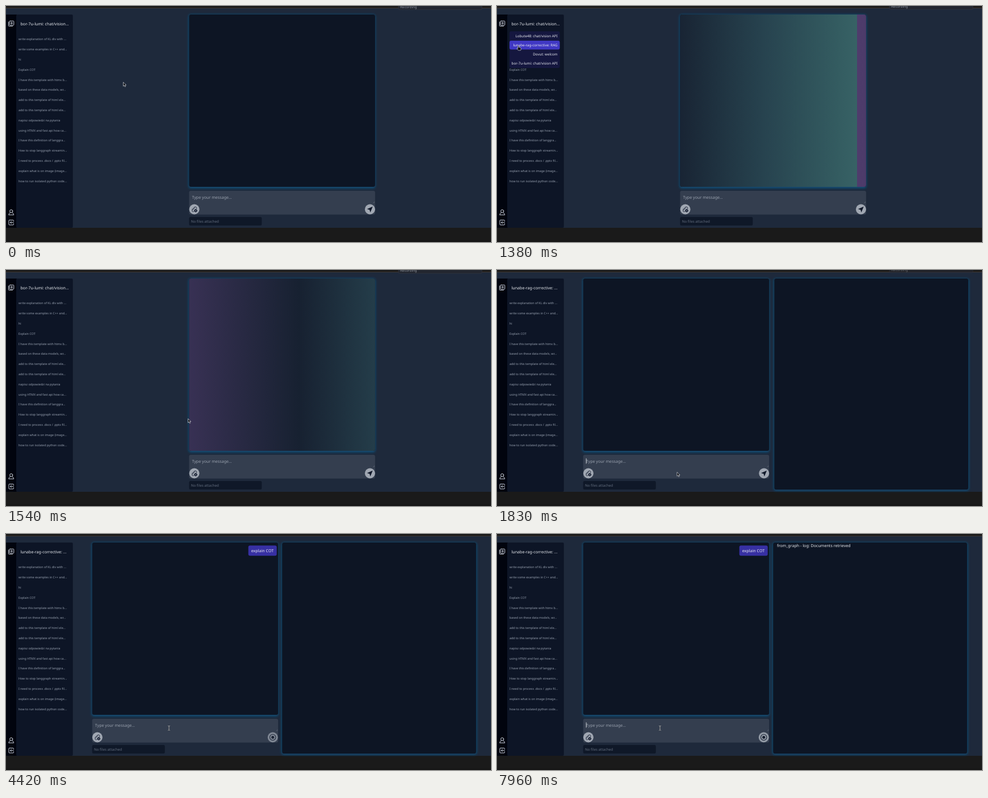
Recreate the animation shown at these times as an HTML page. Size 854 by 415 pixels, loop 8 s.

```html
<!DOCTYPE html>
<html lang="en">
<head>
<meta charset="utf-8">
<title>Chat</title>
<style>
html, body { margin: 0; width: 100%; height: 100%; overflow: hidden; background: #1a1a1a; }
svg { display: block; width: 100vw; height: 100vh; }
text { font-family: "Noto Sans", sans-serif; font-size: 7.117px; fill: #e8ebf0; white-space: pre; text-rendering: geometricPrecision; }
.xs { font-size: 5.337px; fill: #98a1b0; }
.sm { font-size: 6.227px; }
.panel { fill: #0d1524; }
.glow { fill: #075d8f; opacity: .75; filter: url(#soft); }
.line { fill: none; stroke: #dfe4ec; stroke-width: .9; stroke-linecap: round; stroke-linejoin: round; }
.dark { fill: none; stroke: #172033; stroke-width: .9; stroke-linecap: round; stroke-linejoin: round; }
.mouse { fill: #0b0d12; stroke: #e6e8ec; stroke-width: .65; stroke-linejoin: round; }
</style>
</head>
<body>
<svg viewBox="0 0 854 415" preserveAspectRatio="none">
  <defs>
    <filter id="soft" x="-10%" y="-10%" width="120%" height="120%"><feGaussianBlur stdDeviation="2"/></filter>
    <linearGradient id="shimmer" gradientUnits="userSpaceOnUse" x1="0" x2="654" y1="0" y2="0" spreadMethod="repeat">
      <stop offset="0" stop-color="#4f3c6c"/>
      <stop offset=".5" stop-color="#172131"/>
      <stop offset=".75" stop-color="#27434f"/>
      <stop offset="1" stop-color="#376265"/>
    </linearGradient>
  </defs>

  <rect width="854" height="415" fill="#1a1a1a"/>
  <rect y="412.5" width="854" height="2.5" fill="#151515"/>
  <rect y="4" width="854" height="386" fill="#1e293b"/>
  <rect y="3" width="854" height="1" fill="#41362f"/>
  <g id="toast">
    <rect x="691" y="-4" width="147" height="10.4" rx="2" fill="#22262f" stroke="#363b45" stroke-width=".6"/>
    <text class="sm" x="694" y="3.6" style="fill:#8b8f97">Recording</text>
  </g>

  <rect x="0" y="15" width="19" height="375" fill="#01040e"/>
  <rect x="18" y="15" width="99.7" height="375" rx="2" fill="#0d1526"/>
  <g class="line">
    <path d="M4.4 28v6.6q0 .8.8.8h6.4"/>
    <rect x="6.2" y="26.4" width="7.6" height="7.4" rx="1"/>
    <path d="M10 28.2v3.8M8.1 30.1h3.8"/>
    <circle cx="9.2" cy="360.8" r="2.6"/>
    <path d="M7.6 363.2q-2.5 1-2.9 4.1h9q-.4-3.100-2.900-4.100"/>
    <path d="M13.400 378.600v-1.200q0-1-1-1H6q-1 0-1 1v6.600q0 1 1 1h6.400q1 0 1-1v-1.200"/>
    <path d="M13.400 380.700H7.600M9.400 378.900l-1.900 1.800 1.900 1.800"/>
  </g>
  <text id="title" x="25.5" y="33.600"></text>
  <g id="history"></g>
  <g id="menu"></g>

  <g id="main">
    <rect class="glow" x="-.8" y="15" width="328.600" height="305.500" rx="4"/>
    <rect class="panel" y="15" width="327.500" height="303" rx="3.500"/>
    <rect id="loading" y="15" width="327.500" height="303" rx="3.500" fill="url(#shimmer)"/>
    <rect y="325" width="327.500" height="41.700" rx="3" fill="#343e4f"/>
    <path d="M324.300 346.300l2.200-2.200M325.600 346.300l.9-.9" stroke="#8d95a2" stroke-width=".4"/>
    <text id="field" x="5" y="338.600"></text>
    <rect id="caret" y="331.200" width=".8" height="9.300" fill="#e8ebf0"/>
    <circle cx="9.200" cy="357.500" r="9" fill="#a0a7b2"/>
    <g class="dark">
      <path d="M4.800 358.300l4.600-4.500q1.700-1.500 3.200 0t0 3.100l-4.500 4.400q-1.300 1.100-2.400 0t0-2.300l4.200-4.100"/>
      <circle cx="11.600" cy="359.900" r="2.300" fill="#172033"/>
      <path d="M11.600 358.800v2.200M10.500 359.900h2.200" style="stroke:#a0a7b2;stroke-width:.5"/>
    </g>
    <g id="send">
      <circle cx="318.500" cy="357.500" r="9" fill="#a0a7b2"/>
      <path d="M323.300 352.700l-10 4.200 4.500 1.500 1.300 4.500z" fill="#101829"/>
    </g>
    <g id="stop">
      <circle cx="318" cy="357.500" r="9" fill="#a0a7b2"/>
      <circle class="dark" cx="318" cy="357.500" r="5.200" style="stroke-width:1.100"/>
      <circle cx="318" cy="357.500" r="2.500" fill="#101829"/>
    </g>
    <rect y="371" width="128" height="15" rx="2.500" fill="#0f1828"/>
    <text class="sm" x="3.300" y="380.800" style="fill:#667080">No files attached</text>
    <g id="bubble">
      <rect x="275" y="20.300" width="50" height="18" rx="3" fill="#3730a3"/>
      <text x="280" y="32">explain COT</text>
    </g>
  </g>

  <g id="side">
    <rect class="glow" x="485.300" y="15" width="343.400" height="373" rx="4"/>
    <rect class="panel" x="486.200" y="15" width="341.600" height="371.300" rx="3.500"/>
    <text id="log" x="493" y="22.900">from_graph - log: Documents retrieved</text>
  </g>

  <path id="arrow" class="mouse" d="M0 0v7l1.700-1.500 1.200 2.600 1.200-.6-1.200-2.500h2.300z"/>
  <path id="hand" class="mouse" d="M-.8 0q.9-.8 1.600.2v2.900q2.800.1 3.800 1.200.5 2-.5 4.200h-4.100q-1.300-1.300-2.700-3.300.4-1.200 1.900.1z"/>
  <g id="beam" fill="none">
    <path d="M-1.800-4q1.300 0 1.800.8.500-.8 1.800-.8M0-3.200v6.400M-1.800 4q1.300 0 1.800-.8.500.8 1.800.8" stroke="#14181f" stroke-width="1.700"/>
    <path d="M-1.800-4q1.300 0 1.800.8.500-.8 1.800-.8M0-3.200v6.400M-1.800 4q1.300 0 1.800-.8.500.8 1.800.8" stroke="#e8ebf0" stroke-width=".8"/>
  </g>
</svg>
<script>
const LOOP = 8000;
const SWAP = 1640, SEND = 4080, LOG = 4640;
const MENU = [480, 1420];
const LOAD = 1143;
const $ = id => document.getElementById(id);
const show = (id, on) => $(id).setAttribute('visibility', on ? 'visible' : 'hidden');
const move = (id, x, y = 0) => $(id).setAttribute('transform', `translate(${x} ${y})`);
const clamp = v => Math.min(1, Math.max(0, v));

const rows = [
  'write explanation of KL div with ...', 'write some examples in C++ and...', 'hi', 'Explain COT',
  'I have this template with htmx b...', 'based on these data models, wr...',
  'add to this template of html ele...', 'add to this template of html ele...',
  'napisz odpowiedzi na pytania', 'using HTMX and fast api how ca...',
  'I have this definition of langgra...', 'How to stop langgraph streamin...',
  'I need to process .docs / .pptx fil...', 'explain what is on image (image...',
  'how to run isolated python code...'
];
$('history').innerHTML = rows.map((s, i) =>
  `<text class="xs" x="22" y="${60.3 + i * 17.8}">${s}</text>`).join('');

const options = ['Lobute48: chat/vision API', 'lunabe-rag-corrective: RAG', 'Dovut: welcom', 'bor-7u-lumi: chat/vision API'];
$('menu').innerHTML = '<rect x="22" y="44.500" width="88.500" height="64.500" rx="3" fill="#15173f"/>' +
  '<rect id="hover" x="22" width="88.500" height="15.600" rx="3" fill="#4038c4"/>' +
  options.map((s, i) => `<text class="sm" x="106.600" y="${55.3 + i * 16}" text-anchor="end">${s}</text>`).join('');

// [time, x, y] of the pointer's hot spot
const path = [
  [0, 206.5, 134], [40, 206.5, 134], [300, 120, 72], [520, 62, 36], [830, 45, 50],
  [1000, 45, 50], [1100, 36.5, 69.5], [1380, 37.5, 69.5], [1540, 320.5, 261.5],
  [1680, 326, 330], [1830, 317, 355.5], [2120, 300, 347], [2400, 287, 341.3]
];
function pointer(t) {
  const i = path.findIndex(p => p[0] > t);
  if (i < 0) return path[path.length - 1].slice(1);
  const [a, b] = [path[i - 1], path[i]];
  let k = (t - a[0]) / (b[0] - a[0]);
  k = k * k * (3 - 2 * k);
  return [a[1] + (b[1] - a[1]) * k, a[2] + (b[2] - a[2]) * k];
}

const message = 'explain COT';
const keys = [2380, 2500, 2750, 2830, 2920, 3000, 3040, 3130, 3330, 3500, 3540];
// caret offset after each character, in em
const advance = [.564, 1.093, 1.708, 1.966, 2.527, 2.785, 3.403, 3.663, 4.295, 5.076, 5.632];

function drawField(t) {
  const n = t < SEND ? keys.filter(k => k <= t).length : 0;
  const field = $('field');
  field.textContent = n ? message.slice(0, n) : 'Type your message...';
  field.style.fill = n ? '#e8ebf0' : '#99a1ae';
  const since = n ? keys[n - 1] : t < SEND ? 1700 : 3560;
  show('caret', t >= 1700 && (t - since) % 1000 < 510);
  $('caret').setAttribute('x', 5 + (n ? advance[n - 1] * 7.117 : 0));
}

function drawPointer(t) {
  const [x, y] = pointer(t);
  const open = t >= MENU[0] && t < MENU[1];
  const kind = open && x < 110 && y > 25 ? 'hand' : t > 1900 && y < 347.5 ? 'beam' : 'arrow';
  for (const id of ['arrow', 'hand', 'beam']) {
    show(id, id === kind);
    move(id, x, y);
  }
  $('menu').style.display = open ? '' : 'none';
  const row = Math.floor((y - 45) / 16);
  $('hover').style.display = row >= 0 && row < 4 ? '' : 'none';
  $('hover').setAttribute('y', 61 + (row - 1) * 16);
}

// ease in and out between full and half strength
function pulse(t) {
  const p = ((t - 4130) % 1000 + 1000) % 1000 / 500;
  const k = p < 1 ? p : 2 - p;
  return 1 - .5 * k * k * (3 - 2 * k);
}

function draw(t) {
  const swapped = t >= SWAP, sent = t >= SEND;
  $('title').textContent = swapped ? 'lunabe-rag-corrective: ...' : 'bor-7u-lumi: chat/vision...';
  move('main', swapped ? 151.7 : 322.4);
  show('loading', t >= LOAD && !swapped);
  $('shimmer').setAttribute('gradientTransform', `translate(${-654 + (t - LOAD) * 1.308} 0)`);

  const k = clamp((t - SWAP) / 280);
  $('side').style.display = swapped ? '' : 'none';
  $('side').style.opacity = clamp(k * 2);
  move('side', 65 * (1 - k) ** 3);

  show('bubble', sent);
  show('stop', sent);
  show('send', !sent);
  show('log', t >= LOG);
  $('stop').style.opacity = pulse(t);

  const leave = clamp((t - 1580) / 700);
  $('toast').style.opacity = 1 - leave;
  move('toast', 0, -3 * leave - (t > 900 ? .5 : 0));

  drawField(t);
  drawPointer(t);
}

const start = performance.now();
function tick() {
  draw((performance.now() - start) % LOOP);
  requestAnimationFrame(tick);
}
tick();
</script>
</body>
</html>
```
